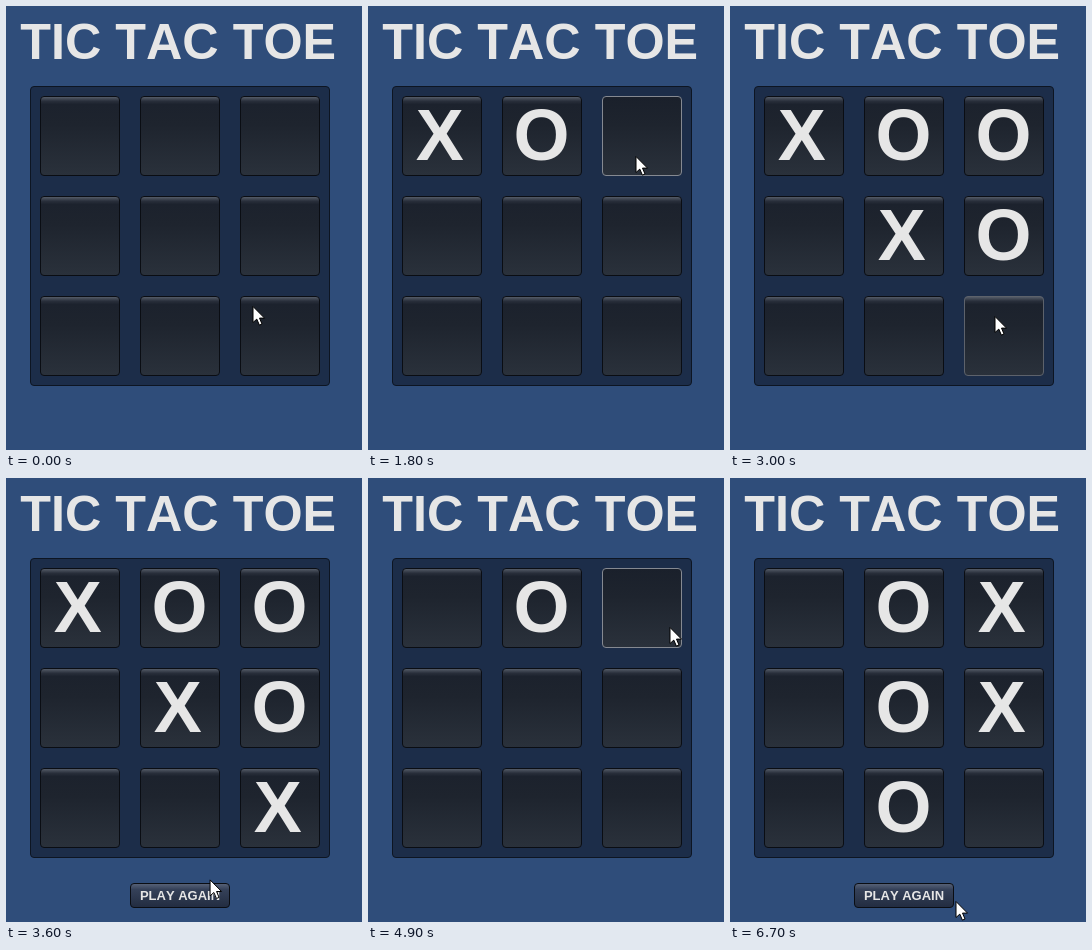
These frames come from a looping animation (356x444 px, 7100 ms). An HTML page:

```html
<!DOCTYPE html>
<html lang="en">
<head>
<meta charset="utf-8">
<title>Tic Tac Toe</title>
<style>
  html, body { margin: 0; width: 100%; height: 100%; overflow: hidden; background: #2f4d7a; }
  svg { display: block; }
  text {
    font: bold 72px "Liberation Sans", Arial, sans-serif;
    font-kerning: none; text-anchor: middle; fill: #e6e6e6;
  }
  .title { font-size: 50.3px; }
  .board { fill: #1c2d49; stroke: #0d1522; }
  .key rect { fill: url(#raised); stroke: #0a0d13; }
  .key.hover rect { stroke: #5d626b; }
  .key.hover text { fill: #fff; }
  .key.pressed rect { fill: url(#flat); stroke: #858991; }
  #again rect { fill: url(#button); }
  #again text { font-size: 13px; }
  #cursor { fill: #fff; stroke: #000; }
</style>
</head>
<body>
<svg width="356" height="444" viewBox="0 0 356 444">
  <defs>
    <linearGradient id="flat" x2="0" y2="1">
      <stop stop-color="#1a202b"/>
      <stop offset=".35" stop-color="#1e242e"/>
      <stop offset="1" stop-color="#2a313b"/>
    </linearGradient>
    <linearGradient id="raised" x2="0" y2="1">
      <stop offset=".01" stop-color="#515864"/>
      <stop offset=".06" stop-color="#282e3a"/>
      <stop offset=".1" stop-color="#1c222d"/>
      <stop offset=".35" stop-color="#1e242e"/>
      <stop offset="1" stop-color="#2a313b"/>
    </linearGradient>
    <linearGradient id="button" x2="0" y2="1">
      <stop offset=".04" stop-color="#535e74"/>
      <stop offset=".25" stop-color="#354159"/>
      <stop offset="1" stop-color="#222c40"/>
    </linearGradient>
  </defs>
  <text class="title" x="172.2" y="53">TIC TAC TOE</text>
  <rect class="board" x="24.5" y="80.5" width="299" height="299" rx="3.5"/>
  <g id="cells"></g>
  <g id="again" class="key">
    <rect x="124.5" y="405.5" width="99" height="24" rx="3.5"/>
    <text x="174" y="422">PLAY AGAIN</text>
  </g>
  <path id="cursor" d="M0 0V16L3.8 12.6L6.4 18.6L9 17.5L6.5 11.6H11.5Z"/>
</svg>
<script>
const LOOP = 7100, STEP = 100;
const TRAVEL = 500, REST = 200, PRESS = 100;
const LEFT = 34, TOP = 90, PITCH = 100, SIZE = 80;

// Where the cursor arrives: [time, x, y]. It rests, clicks, then moves on.
const stops = [
  [-REST, 247, 300],
  [600, 174, 148], [1100, 91, 153], [1700, 268, 150], [2300, 208, 214], [2650, 268, 225],
  [3000, 265, 310], [3700, 197, 412],
  [4400, 188, 148], [4800, 302, 149], [5100, 198, 230], [5400, 258, 234], [5800, 189, 298],
  [6700, 226, 423]
];

const get = id => document.getElementById(id);
const smooth = k => k * k * (3 - 2 * k);

get("cells").innerHTML = Array.from({ length: 9 }, (_, i) =>
  `<g class="key" transform="translate(${LEFT + i % 3 * PITCH} ${TOP + Math.floor(i / 3) * PITCH})">
    <rect x=".5" y=".5" width="79" height="79" rx="3.5"/><text y="64"></text></g>`).join("");
const cells = [...get("cells").children];

function cellAt(x, y) {
  const dx = x - LEFT, dy = y - TOP;
  const col = Math.floor(dx / PITCH), row = Math.floor(dy / PITCH);
  const hit = dx % PITCH < SIZE && dy % PITCH < SIZE && row < 3;
  return hit ? row * 3 + col : -1;
}

const onButton = (x, y) => x >= 124 && x < 224 && y >= 405 && y < 430;

function cursorAt(t) {
  const next = stops.findIndex(s => s[0] > t);
  if (next < 0) return stops[stops.length - 1].slice(1);
  const [t0, x0, y0] = stops[next - 1], [t1, x1, y1] = stops[next];
  const leave = Math.max(t0 + REST, t1 - TRAVEL);
  const k = smooth(Math.max(0, (t - leave) / (t1 - leave)));
  return [x0 + (x1 - x0) * k, y0 + (y1 - y0) * k];
}

function hasWon(board) {
  const line = (start, step) => board[start] &&
    board[start] === board[start + step] && board[start] === board[start + 2 * step];
  return [0, 1, 2].some(i => line(i, 3) || line(i * 3, 1)) || line(0, 4) || line(2, 2);
}

// Replay every click made up to time t
function boardAt(t) {
  let board = [], turn = 0;
  for (const [time, x, y] of stops.slice(1)) {
    if (time + REST > t) break;
    const cell = cellAt(x, y);
    if (onButton(x, y)) { board = []; turn = 0; }
    else if (cell >= 0) board[cell] = "OX"[turn++ % 2];
  }
  return board;
}

function render(t) {
  const [x, y] = cursorAt(t);
  const board = boardAt(t);
  const hovered = t > 0 ? cellAt(x, y) : -1;
  const pressing = stops.some(([time]) => t >= time + REST - PRESS && t < time + REST);
  cells.forEach((cell, i) => {
    const label = cell.lastChild;
    label.textContent = board[i] || "";
    label.setAttribute("x", board[i] === "X" ? 37.8 : 39.6);
    cell.classList.toggle("hover", i === hovered);
    cell.classList.toggle("pressed", i === hovered && pressing);
  });
  get("again").style.display = hasWon(board) ? "" : "none";
  get("again").classList.toggle("hover", onButton(x, y));
  get("cursor").setAttribute("transform", `translate(${x} ${y + .5})`);
}

const begin = performance.now();
function tick() {
  const t = (performance.now() - begin) % LOOP;
  render(Math.floor(t / STEP) * STEP);
  requestAnimationFrame(tick);
}
tick();
</script>
</body>
</html>
```
